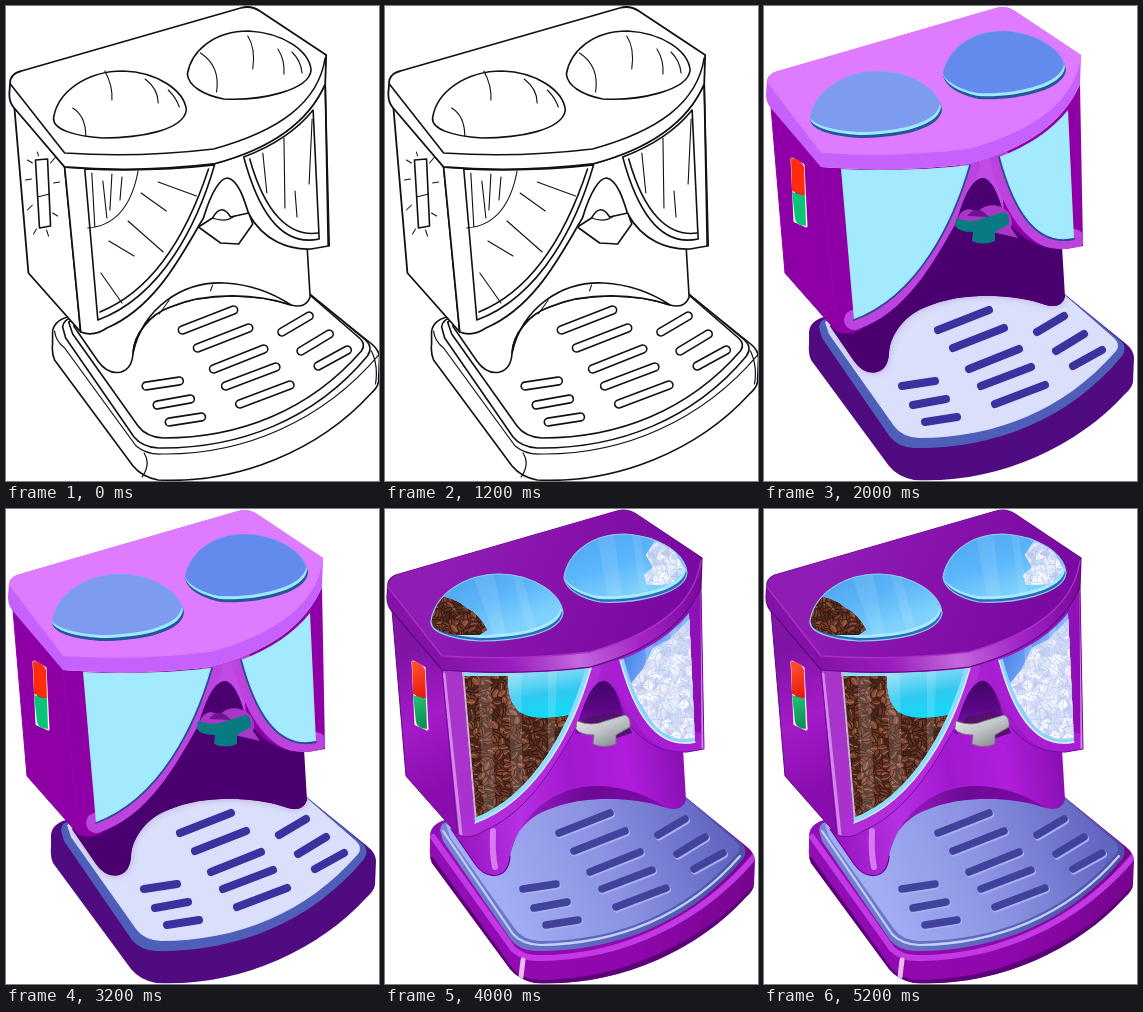
These frames come from a looping animation (373x475 px, 6 s). An HTML page with a canvas:

```html
<!DOCTYPE html>
<html lang="en">
<head>
<meta charset="utf-8">
<title>Drink machine: sketch, flat colour, render</title>
<style>
html, body { margin: 0; width: 100%; height: 100%; overflow: hidden; background: #fff; }
canvas { display: block; }
</style>
</head>
<body>
<canvas id="stage" width="373" height="475"></canvas>
<script>
const ctx = document.getElementById('stage').getContext('2d');
const path = d => new Path2D(d);

const shape = {
  cap: path('M3 74Q5 67 14 65L232 2Q242-1 251 5L317 49L316 78C300 115 265 142 205 158Q130 167 57 161L6 101Q2 96 2 88Z'),
  top: path('M3 76Q5 67 14 65L232 2Q242-1 251 5L317 49C312 95 270 125 205 143Q130 152 57 147Z'),
  capEdge: path('M3 78L57 147Q130 152 205 143C270 125 309 97 316 52'),
  side: path('M7 101L21 267L73 326L57 161Z'),
  front: path('M57 161L73 326Q86 331 99 322C150 300 176 243 195 212C203 185 212 172 219 172C230 174 236 195 240 208C255 235 280 244 302 243L319 240L316 78C300 115 265 142 205 158Q130 167 57 161Z'),
  inner: path('M66 320L90 355Q100 369 113 366Q124 363 125 347C126 328 142 308 162 301C200 285 250 288 282 299Q297 303 301 291L298 240L219 160L120 290Z'),
  arch: path('M125 347C135 302 174 275 216 277Q252 279 282 299C250 288 200 285 162 301C142 308 126 328 125 347Z'),
  nose: path('M190 225C200 185 210 172 219 172C230 174 237 195 242 225Z'),
  glassL: path('M77 163Q145 166 206 159C190 215 155 290 90 314Z'),
  glassR: path('M235 151Q280 134 304 104L310 233C278 240 252 215 235 151Z'),
  curveL: path('M206 159C190 215 155 290 90 314'),
  curveR: path('M235 151C252 215 278 240 310 233'),
  domeL: path('M46 112C50 85 80 65 115 65C150 66 176 85 178 104C175 125 130 132 95 132C65 130 45 123 46 112Z'),
  domeR: path('M179 68C183 45 205 25 240 25C275 27 300 45 302 64C300 85 250 95 215 93C195 89 180 80 179 68Z'),
  base: path('M45 326Q46 315 60 311L140 275H285L303 290L361 337Q370 344 370 352L369 376Q368 382 361 388C310 444 230 478 150 474Q134 471 125 460L47 354Q44 347 45 338Z'),
  rim: path('M55 321Q56 313 66 311L140 275H285L303 290L356 334Q364 341 358 350C305 414 230 443 150 442Q134 441 126 431L58 332Z'),
  plate: path('M61 316L140 275H285L303 291L350 332Q357 338 352 345C300 405 230 432 155 432Q138 431 130 420L65 328Z'),
  spout: path('M192 212Q207 218 220 212L240 206Q246 208 245 218L231 226L231 235Q219 240 208 235L209 226Q195 226 191 220Z'),
  slots: path('M174 324L225 304M189 342L240 322M205 363L255 343M217 380L267 361M231 398L281 379M273 326L300 310M292 345L320 328M309 360L338 344M138 380L171 375M149 399L182 393M161 416L193 411')
};

function fill(p, color) { ctx.fillStyle = color; ctx.fill(p); }
function stroke(p, color, width = 1.6) {
  ctx.strokeStyle = color;
  ctx.lineWidth = width;
  ctx.stroke(p);
}
function isolated(draw) {
  ctx.save();
  draw();
  ctx.restore();
}
function within(p, draw) {
  isolated(() => { ctx.clip(p); draw(); });
}
function gradient(x1, y1, x2, y2, ...colors) {
  const g = ctx.createLinearGradient(x1, y1, x2, y2);
  colors.forEach((c, i) => g.addColorStop(i / (colors.length - 1), c));
  return g;
}
function randomizer(seed) {
  return () => (seed = seed * 16807 % 2147483647) / 2147483647;
}

// Calls draw on a jittered lattice, with a random generator for variation.
function scatter(x1, y1, x2, y2, step, draw) {
  const rnd = randomizer(x1 * 97 + y1 * 31 + 7);
  for (let y = y1; y < y2; y += step)
    for (let x = x1; x < x2; x += step)
      isolated(() => {
        ctx.translate(x + rnd() * step, y + rnd() * step);
        ctx.rotate(rnd() * Math.PI);
        draw(rnd);
      });
}

const bean = path('M-5 0A5 3.4 0 1 1 5 0A5 3.4 0 1 1-5 0');
const crease = path('M-4 0Q0-1.5 4 0');
function drawBean(rnd) {
  fill(bean, `hsl(${11 + rnd() * 8} 44% ${20 + rnd() * 18}%)`);
  stroke(bean, '#35180f', 0.7);
  stroke(crease, rnd() < 0.45 ? '#28100b' : '#a36c58', 0.9);
}
const cube = path('M-5-4L4-5L6 3L-3 5Z');
const cubeEdge = path('M-5-4L0 0L6 3M0 0L-3 5');
function drawCube(rnd) {
  fill(cube, `hsl(${215 + rnd() * 20} 65% ${86 + rnd() * 14}%)`);
  stroke(cubeEdge, '#a9bce899', 0.9);
}

function drawSketch() {
  const ink = '#111';
  const outlined = (p, width) => { fill(p, '#fff'); stroke(p, ink, width); };
  ctx.translate(1.3, 0);
  ctx.scale(1.006, 1);
  ['base', 'rim', 'plate'].forEach(k => outlined(shape[k]));
  stroke(path('M47 325Q48 335 57 342L128 440Q139 449 154 448C235 449 314 415 370 348M136 447Q143 458 134 471M362 345Q369 360 366 378'), ink, 1.2);
  stroke(shape.slots, ink, 9.5);
  stroke(shape.slots, '#fff', 6.3);
  outlined(shape.inner);
  outlined(shape.arch);
  stroke(path('M151 308L161 294M202 285L204 279'), ink, 1);
  outlined(shape.side, 1.8);
  outlined(shape.front, 1.7);
  outlined(shape.glassL);
  outlined(shape.glassR);
  stroke(path('M200 163C182 218 151 282 92 306M241 153C256 207 280 231 309 227M316 78L320 240'), ink);
  stroke(path('M84 167L87 221M80 222Q120 219 130 165M95 175L99 212M104 168L102 204M114 171L112 194M150 176L188 190M133 187L158 205M120 215L155 246M101 235L126 250M93 267L114 297M254 147L258 187M275 132L276 202M303 113L300 178M286 185L288 211'), ink, 1.1);
  outlined(shape.cap, 1.8);
  stroke(shape.capEdge, ink);
  outlined(shape.domeL);
  outlined(shape.domeR);
  stroke(path('M97 65Q105 80 104 94M65 102Q78 110 78 130M137 73Q150 83 150 97M160 84Q168 92 171 101M192 47Q212 60 208 86M239 30Q247 42 244 63M269 43Q276 54 275 68M283 46Q292 55 293 67'), ink, 1.1);
  outlined(path('M190 221L204 212Q213 196 222 211L240 207L244 218L230 238L212 237Z'));
  stroke(path('M204 212Q217 217 226 210'), ink, 1.1);
  outlined(path('M28 154L40 153L43 220L32 222Z'));
  stroke(path('M30 191L42 188M25 157L20 154M24 173L18 174M25 199L20 204M29 223L26 228M39 224L41 230M45 207L50 210M46 177L52 176M43 157L48 151M31 150L30 146'), ink, 1);
}

function drawSwitch(red, green) {
  stroke(path('M28 153L39 159L42 220L31 215Z'), '#fff', 3);
  fill(path('M27 152Q38 154 40 161L41 190L28 185Z'), red);
  fill(path('M28 186L41 190L42 220Q32 219 31 213Z'), green);
}

// A dome seen from above: dark seat, bright lip, then the surface itself.
function drawDome(p, seat, lip, surface) {
  fill(p, seat);
  within(p, () => {
    ctx.translate(-1, -3);
    fill(p, lip);
    ctx.translate(-1, -3);
    fill(p, surface);
  });
}

function drawFlat() {
  fill(shape.base, '#510b80');
  fill(shape.rim, '#4f5fb9');
  fill(shape.plate, '#dadffc');
  stroke(shape.slots, '#3a329e', 8);
  within(shape.plate, () => {
    ctx.shadowColor = '#b7a3d6';
    ctx.shadowBlur = 7;
    fill(shape.inner, '#4b0070');
  });
  fill(shape.inner, '#4b0070');
  fill(shape.side, '#8e00a5');
  stroke(shape.side, '#8e00a5', 1);
  fill(shape.front, '#8e00a5');
  within(shape.front, () => {
    fill(path('M206 155L236 149L240 208L219 172L195 212Z'), '#c24ae6');
    stroke(shape.curveL, '#bd43df', 20);
    stroke(shape.curveR, '#bd43df', 20);
  });
  for (const k of ['L', 'R']) {
    fill(shape['glass' + k], '#a3eaff');
    stroke(shape['curve' + k], '#284b91', 1.8);
  }
  fill(shape.nose, '#4b0070');
  fill(path('M196 224C188 208 204 197 213 207C226 190 254 204 247 222L254 232L224 225Z'), '#a936c9');
  fill(path('M203 210Q213 197 225 211Z'), '#701391');
  fill(shape.spout, '#087b82');
  fill(shape.cap, '#c661fb');
  fill(shape.top, '#df7bff');
  drawDome(shape.domeL, '#25549a', '#9debff', '#7d9cef');
  drawDome(shape.domeR, '#25549a', '#9debff', '#638bed');
  drawSwitch('#ff2b0a', '#08c477');
}

function drawRender() {
  const edge = '#5c0a80';
  fill(shape.base, gradient(50, 340, 365, 400, '#8f0fb5', '#9408b0', '#8f07ac', '#75058f'));
  within(shape.base, () => {
    stroke(path('M48 328L128 440Q139 450 155 449C235 449 314 413 369 348'), '#c238e2', 6);
    stroke(path('M46 351L126 462Q138 474 155 474C235 474 320 436 369 380'), '#5c0278', 6);
    stroke(path('M138 451L136 468'), '#e9b8f5', 5);
  });
  fill(shape.rim, gradient(60, 330, 360, 350, '#7983d4', '#5f68bd', '#4d51a6'));
  fill(shape.plate, gradient(110, 400, 330, 310, '#a3aff5', '#8b93e2', '#6266c1'));
  stroke(path('M58 322L128 425Q137 435 155 436C232 435 303 407 355 347'), '#c3d2ff', 2.2);
  isolated(() => {
    ctx.translate(1, 1.5);
    stroke(shape.slots, '#a5b0ef', 8);
  });
  stroke(shape.slots, '#41429b', 7.5);

  fill(shape.inner, gradient(75, 300, 300, 270, '#9a18c4', '#b630e4', '#a218cf', '#b01edc', '#8a10b4'));
  fill(shape.arch, gradient(125, 300, 282, 290, '#a01fc8', '#6d0896', '#7e0aa8'));
  stroke(path('M66 320L90 355Q100 369 113 366Q124 363 125 347'), '#650691', 1.2);
  within(shape.inner, () => stroke(path('M108 322Q107 345 110 358'), '#d77bf2', 6));
  fill(shape.side, gradient(7, 150, 73, 270, '#8014a5', '#a41bc7', '#8a0dae'));
  stroke(shape.side, edge, 1);
  fill(shape.front, gradient(57, 200, 320, 220, '#a736c9', '#b125da', '#8a0db2'));
  within(shape.front, () => {
    stroke(shape.curveL, '#b22cdc', 20);
    stroke(shape.curveR, '#a91ed3', 20);
    stroke(path('M59 165L76 326M317 82L318 239'), '#d487ea', 3);
  });
  stroke(shape.front, '#7a0aa0', 1);

  fill(shape.glassL, gradient(140, 163, 148, 213, '#8ddcf5', '#2fc9f0', '#10dcf8'));
  within(shape.glassL, () => {
    within(path('M75 167H123Q121 191 134 203Q151 214 190 205L150 320L75 320Z'), () => {
      ctx.fillStyle = '#47251b';
      ctx.fillRect(70, 160, 130, 160);
      scatter(72, 160, 190, 318, 6, drawBean);
    });
    fill(path('M93 160H105L111 310H99ZM121 160H136L138 287H128ZM163 160H172L169 250H163Z'), '#ffffff24');
    stroke(path('M77 163L90 314'), '#d6a7e8', 4);
    stroke(shape.curveL, '#8fdcfa', 10);
  });
  fill(shape.glassR, gradient(240, 150, 307, 180, '#4b86ea', '#82b4fc', '#b9d3ff'));
  within(shape.glassR, () => {
    within(path('M244 177L258 160L268 139L285 130L307 108L314 240L285 240Z'), () => {
      ctx.fillStyle = '#d0def8';
      ctx.fillRect(240, 100, 75, 140);
      scatter(240, 105, 312, 238, 7, drawCube);
    });
    fill(path('M260 135H268L273 230H264ZM285 115H292L296 238H289Z'), '#ffffff30');
    stroke(shape.curveR, '#8fd2fa', 8);
  });
  stroke(shape.curveL, '#e3f6ff', 1.3);
  stroke(shape.curveR, '#e3f6ff', 1.3);
  fill(shape.nose, gradient(218, 172, 220, 226, '#43046b', '#5b0785', '#8a12b5'));
  fill(path('M196 219Q202 202 215 207Q224 199 240 208L247 224L229 230Z'), '#53106f');
  fill(shape.spout, gradient(205, 205, 220, 238, '#e3e5e5', '#c3c6ca', '#93959d'));
  stroke(shape.spout, '#777082', 0.9);

  fill(shape.cap, gradient(57, 155, 316, 90, '#8512a8', '#9a1cbd', '#c368dc', '#a222c6', '#7a0a9c'));
  stroke(shape.cap, edge, 1.2);
  fill(shape.top, gradient(70, 50, 260, 130, '#8f1cb4', '#8612ab', '#7a0aa2'));
  stroke(shape.capEdge, '#a830c8', 1.5);
  drawDome(shape.domeL, '#2d68b5', '#a5ecff', gradient(85, 70, 110, 132, '#4fa4ee', '#5cb6f8', '#7fd2fd'));
  within(shape.domeL, () => {
    within(path('M42 88Q66 85 81 99Q94 105 102 121L94 126H70Q45 121 42 110Z'), () => {
      ctx.fillStyle = '#47251b';
      ctx.fillRect(42, 80, 60, 55);
      scatter(43, 84, 104, 130, 5, drawBean);
    });
    fill(path('M87 65L109 64L121 126H109ZM127 66L137 68L152 120H142Z'), '#ffffff18');
  });
  drawDome(shape.domeR, '#2d68b5', '#a5ecff', gradient(220, 30, 240, 93, '#51a9f2', '#5bb6fa', '#7fd0fd'));
  within(shape.domeR, () => {
    within(path('M262 76L259 66L268 58L261 46L270 32L287 38L300 61L286 75Z'), () =>
      scatter(258, 30, 304, 76, 6, drawCube));
    fill(path('M212 27L229 25L237 87H223ZM247 25L255 28L263 84H255Z'), '#ffffff18');
  });
  stroke(shape.domeL, '#8fcdf5', 1.2);
  stroke(shape.domeR, '#8fcdf5', 1.2);
  drawSwitch(gradient(27, 160, 41, 185, '#ff4a2c', '#ea1a0c'), gradient(28, 190, 42, 220, '#24bd70', '#0a8753'));
}

const stages = [drawSketch, drawFlat, drawRender];
const holdTime = 2000;
let shown = -1;
ctx.lineCap = ctx.lineJoin = 'round';

function tick() {
  const index = Math.floor(performance.now() / holdTime) % stages.length;
  if (index !== shown) {
    shown = index;
    ctx.fillStyle = '#fff';
    ctx.fillRect(0, 0, 373, 475);
    isolated(stages[index]);
  }
  requestAnimationFrame(tick);
}
tick();
</script>
</body>
</html>
```
